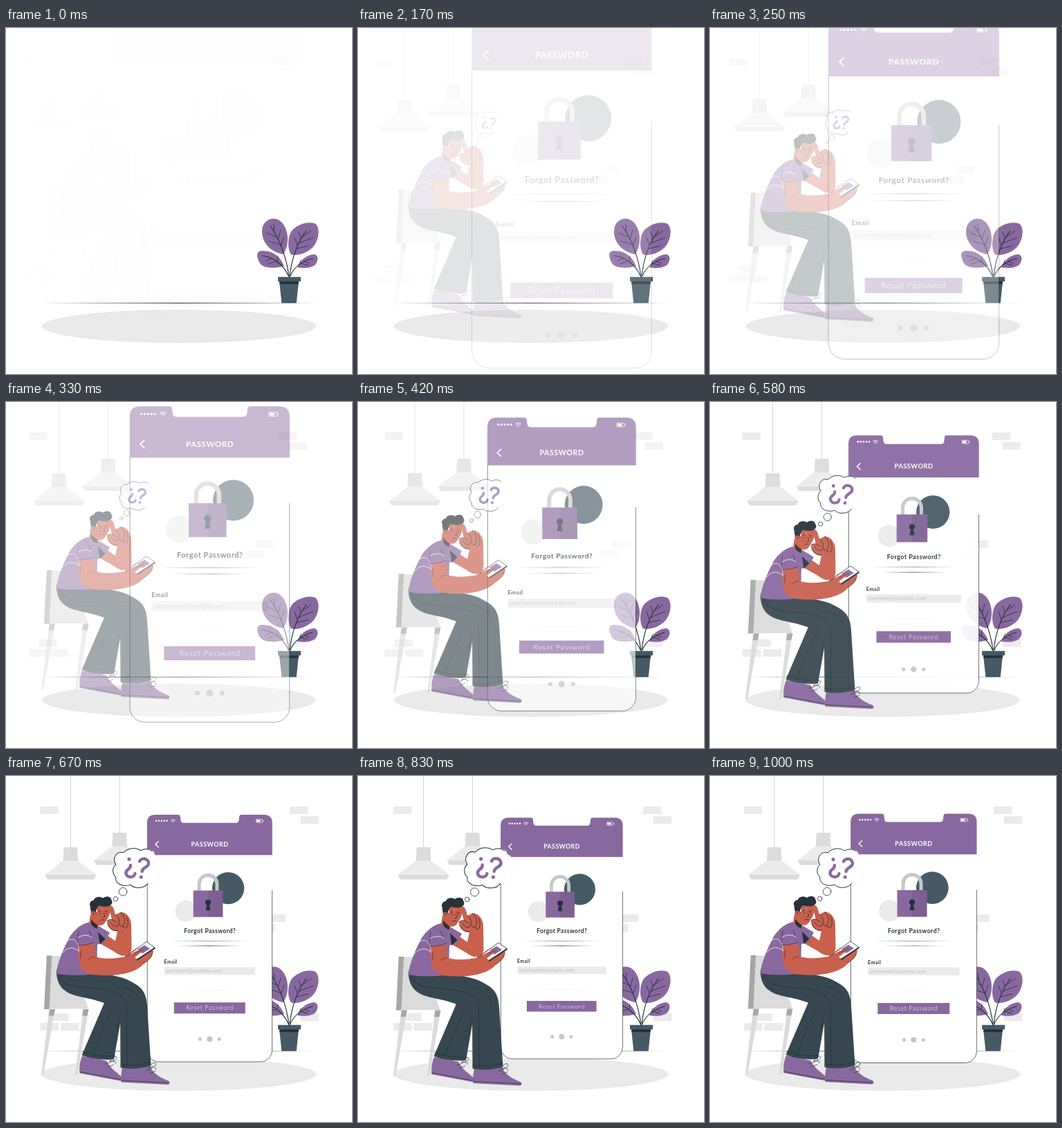
An HTML page that plays this animation: 500 px wide and 500 px high, repeating every 1.04 s.

```html
<!DOCTYPE html>
<html lang="en">
<head>
<meta charset="utf-8">
<title>Forgot password</title>
<style>
  html, body { margin: 0; width: 100%; height: 100%; overflow: hidden; background: #fff; }
  svg { display: block; width: 100vw; height: 100vh; }
  text { font-family: Lato, "Open Sans", sans-serif; font-weight: 700; }
  .thin { font-weight: 300; }
  .purple { fill: #8968a0; }
  .dark { fill: #263238; }
  .slate { fill: #455a64; }
  .pants { fill: #37474f; }
  .skin { fill: #c95f4d; }
  .pale { fill: #ebebeb; }
  .mid { fill: #dbdbdb; }
  .shade { fill: #a6a6a6; }
  .grey { fill: #c7c7c7; }
  .white { fill: #fff; }
  .ink { fill: none; stroke: #263238; stroke-linecap: round; stroke-linejoin: round; }
  .light { fill: none; stroke: #fff; stroke-linecap: round; stroke-linejoin: round; }
</style>
</head>
<body>
<svg viewBox="0 0 500 500" xmlns="http://www.w3.org/2000/svg">
  <defs>
    <g id="lamp">
      <path class="grey" d="M-.4-110h.8V0h-.8z"/>
      <path class="mid" d="M-9.8 0H9.8L10.8 20H-10.8z"/>
      <path class="pale" d="M-11 19.5H11L37 39.5V41H-37V39.5z"/>
      <path class="mid" d="M-37 40H37L33.5 46.5H-33.5z"/>
    </g>
  </defs>

  <g id="bricks" class="pale"></g>
  <g id="lamps">
    <use href="#lamp" x="92.8" y="103"/>
    <use href="#lamp" x="163.7" y="82"/>
  </g>

  <ellipse cx="250" cy="431" rx="198" ry="24" style="fill:#eaeaea"/>
  <path class="dark" d="M50 397.5L250 397.1L450 397.5L250 397.95z"/>

  <g id="plant">
    <g class="purple">
      <path d="M401 327C386 325 370 313 370 294C370 281 379 275.500 387 275.500C399 276 407 290 407 305C407 315 404 321 401 327z"/>
      <path d="M412 327.500C407 320 406 303 413 293C421 283 440 278 448 283.500C455 292 451 311 441 319C431 327 420 329 412 327.500z"/>
      <path d="M402 344C390 347.500 372 348 367 340C362 331 361 322 370 322C386 321.500 396 330 402 344z"/>
      <path d="M421 346C424 336 434 328 445 327C452 328 452 337 446 343C438 348 428 347 421 346z"/>
    </g>
    <g class="ink" stroke-width="1.200">
      <path d="M409 360C406 334 396 305 382 286M410 360C412 334 422 308 434 293M408 358C402 344 388 331 370 329M411 358C416 346 428 337 443 333"/>
      <path stroke-width=".8" d="M388 296L387 284M393 306L397 292M397 315L402 302M391 302L377 296M396 313L380 308M428 302L441 293M423 311L444 303M419 319L437 315M426 304L423 295M421 314L417 303M390 337L379 341M384 333L376 336M392 338L393 330M426 340L436 343M431 337L438 340M424 342L426 336"/>
    </g>
    <path class="slate" d="M395 366H423L419.700 397.500H398.300z"/>
    <path class="dark" d="M395 366H423L422.600 370H395.400z"/>
    <path class="slate" d="M393 359.700H426V366.200H393z"/>
  </g>

  <g id="phone">
    <rect class="white" x="203.500" y="60" width="181.800" height="354.500" rx="17"/>
    <path class="ink" stroke-width=".7" d="M203.500 113V397.500a17 17 0 0 0 17 17H368.300a17 17 0 0 0 17-17V165"/>
    <path class="purple" d="M203.200 113.200V66.500Q203.200 54.500 215 54.500H248.500Q251.500 54.500 251.700 58.500C252 64 252.500 66.500 257 66.500H332C336.500 66.500 337 64 337.300 58.500Q337.500 54.500 340.500 54.500H373.500Q385.500 54.500 385.500 66.500V113.200z"/>
    <g id="signal" class="white"></g>
    <path class="light" stroke-width=".9" d="M237.800 62.500q3.200-2.600 6.400 0M239.200 64.200q1.800-1.400 3.600 0M240.900 65.700h.2"/>
    <rect class="light" stroke-width=".7" x="361.800" y="61.300" width="9.500" height="4.600" rx="1"/>
    <path class="white" d="M362.700 62.200h5.500v2.800h-5.500zM371.900 62.700h.8v1.800h-.8z"/>
    <path class="light" stroke-width="1.400" d="M219.700 93.500L215.200 97.700L219.700 102"/>
    <text class="white" x="294.500" y="100.800" font-size="9" letter-spacing=".5" text-anchor="middle">PASSWORD</text>

    <circle class="slate" cx="321.300" cy="161.600" r="23.300"/>
    <circle class="pale" cx="259.700" cy="194.800" r="15.500"/>
    <path d="M279 167V155.500a13 13 0 0 1 26 0V167" fill="none" stroke="#c7c7c7" stroke-width="5"/>
    <path class="purple" d="M270.500 165H313.500V203.500H270.500z"/>
    <path fill="#000" opacity=".09" d="M292 165H313.500V203.500H292z"/>
    <circle class="dark" cx="292" cy="182.300" r="4"/>
    <path class="dark" d="M290.500 184h3L295.500 194h-7z"/>

    <text class="dark" x="294.700" y="227" font-size="8.700" letter-spacing=".42" text-anchor="middle">Forgot Password?</text>
    <path class="dark" d="M236 238.300L294 238.050L351 238.300L294 238.600zM248 245.700L294 245.450L341 245.700L294 246z"/>
    <text class="dark" x="228" y="271.600" font-size="7.100" letter-spacing=".4">Email</text>
    <path class="pale" d="M228.200 276.500H360.500V288H228.200z"/>
    <text x="231" y="284.500" font-size="7" letter-spacing=".25" style="font-weight:400" fill="#bdbdbd">username@example.com</text>
    <path class="pale" d="M236 310.500L294 310.200L351 310.500L294 310.800z"/>
    <path class="purple" d="M242.300 328H346.200V344H242.300z"/>
    <text class="white thin" x="294.500" y="339.200" font-size="8.900" letter-spacing=".65" text-anchor="middle">Reset Password</text>
    <g class="grey">
      <circle cx="280.300" cy="381.300" r="2.600"/>
      <circle cx="294.300" cy="381.300" r="4"/>
      <circle cx="308.300" cy="381.300" r="2.600"/>
    </g>
  </g>

  <g id="person">
    <path class="mid" d="M65.500 259.500H92L119 336H62z"/>
    <path class="shade" d="M58.800 259H66.200L62.500 336.500H55z"/>
    <path class="mid" d="M62.500 336.500H71L54 432H51zM111.500 336.500H119.500L103 432H100z"/>
    <path class="shade" d="M63 336.500H71L69 346H61.700zM111.500 336.500H119.500L117.500 346H110z"/>

    <path class="purple" d="M110 404C106 414 106 421 106.500 429L165 440Q169 439 167 434C159 427 150 421 145 411z"/>
    <path class="purple" d="M168 421C166 430 166 435 166.500 442L234 445.500Q238 444 235 440C224 436 213 430 207 418z"/>
    <path class="ink" stroke-width=".7" d="M106.500 427L165 438M166.500 439.500L236 443M143 416L151 413M147 420L155 417M203 425L211 422M208 429L216 426M150 412C153 405 161 403 160 407C159 411 153 411 150 412C156 411 161 413 158 415M207 421C210 413 217 412 217 416C216 420 211 420 207 421C214 419 218 421 216 424"/>
    <path class="pants" d="M143 325L109.500 403Q130 411 156 409L167 346L180 320z"/>
    <path class="pants" d="M73 285H130C154 286 173 291 185 299C198 306 203 315 204 332L209.500 418Q188 425 165.500 421L165 345C164 337 158 332 143 328C128 322 112 320 98 316C82 311 74 301 73 285z"/>
    <path class="ink" stroke-width=".8" d="M78 288C82 304 105 304 125 306C150 308 171 312 174 331L175 417M165 345L160 368M157 330L145 355L124 404M166 304C181 307 189 312 193 326M166 416Q188 420 209 413M111 398Q130 406 157 404"/>

    <path class="skin" d="M151 187C155 186 156 193 158 200L166 196C176 197 181 207 181 215L181.500 249C180 262 167 262 156 253L133 240L142 227L158 238L161 224C151 224 146 217 146 209Q149 206 153 207C151 199 149 192 151 187z"/>
    <path class="ink" stroke-width=".8" d="M146 209Q149 206 153 207L160 211M158 200C164 204 165 210 162 216C157 219 153 214 151 211M166 197C172 203 173 210 169 217Q166 218 164 214M174 203Q178 211 175 218Q172 221 169 217M147 214Q152 224 161 223"/>

    <path class="purple" d="M120 211C108 213 99 222 92 232C83 249 76 266 72 285Q100 290 131 285L132 243L143 239L150 226L135 217z"/>
    <path class="dark" d="M133 225L143.500 235L135.500 243z"/>
    <path class="skin" d="M122 200L133 203L134 218Q127 221 120 212z"/>
    <path class="dark" d="M123 207L132 215L132 220Q126 219 123 213z"/>
    <path class="skin" d="M124 188C121 196 122 207 128 212C134 217 140 217 144 210C149 204 152 195 152 187L146 180z"/>
    <path class="dark" d="M127 200C124 196 121 193 122 188C119 184 123 179 127 179C128 174 136 173 140 176C145 172 152 174 152 178C155 182 153 186 149 187C144 190 138 187 134 187L131 191L130 199z"/>
    <circle class="skin" cx="126.500" cy="198.500" r="3.400"/>
    <path class="ink" stroke-width=".8" d="M133.500 195.500L137 194M143 195L146.500 195.500M141.500 198L143 203L140 203.500M136 208Q139 206.500 142 207.500M125 197Q127 197 127 200"/>
    <circle class="dark" cx="136" cy="198" r=".8"/>
    <circle class="dark" cx="145" cy="198" r=".8"/>
    <path class="white" d="M131 192Q132.500 195 131 196.500Q129 195.500 131 192zM139 190q1 2 0 3q-1-1 0-3z"/>

    <path class="skin" d="M105 240L126 238L130 261C145 265 159 263 171 261L186 250L197 244L205 247L212 250C214 260 204 266 196 274C181 287 151 289 130 287C111 286 105 275 105 262z"/>
    <path class="purple" d="M109 217Q119 218 122 226L127 240Q116 245 104 244L103 228z"/>
    <path class="ink" stroke-width=".7" d="M104 244Q116 245 127 240M105 224Q102 236 104 247M120 223L123 230M108 252L108 263M128 261Q122 261 119 265"/>
    <path class="light" stroke-width=".75" d="M89 238C98 230 106 241 105 252M82 255C89 246 98 246 106 253M104 233Q116 226 124 233"/>
    <path class="white" d="M178 257L203 239L215 247.500L190 264z"/>
    <path class="ink" stroke-width=".8" d="M178 257L203 239L215 247.500L190 264"/>
    <path class="ink" stroke-width="1.800" d="M215 248.300L190 265"/>
    <path class="purple" d="M190 250L200 244L208 249L197 256z"/>
    <path class="skin" d="M180 257Q189 251 197 250Q200 252 196 254L188 260L181 266zM196 264L208 256Q213 251 213 253Q212 262 203 267z"/>
    <path class="ink" stroke-width=".7" d="M187 256Q194 251 198 251M199 270Q209 265 211 257M172 261L180 257"/>
  </g>

  <g id="bubble">
    <path class="white" d="M159 128C153 119 160 108 170 111C176 104 188 103 194 108C203 103 214 106 215 114C224 117 225 129 221 135C224 147 216 157 205 155C200 163 185 163 180 157C169 161 157 155 159 146C153 141 154 132 159 128z"/>
    <path class="ink" d="M205 155C200 163 185 163 180 157C169 161 157 155 159 146C153 141 154 132 159 128C153 119 160 108 170 111C176 104 188 103 194 108C200 105 207 105 211 109"/>
    <path class="ink" stroke-width=".3" stroke-dasharray="2 5" opacity=".35" d="M215 114C224 117 225 129 221 135C224 147 216 157 205 155"/>
    <circle class="white" cx="169.200" cy="167" r="5.800"/>
    <circle class="ink" stroke-width=".8" cx="169.200" cy="167" r="5.800"/>
    <circle class="white" cx="158.700" cy="177.300" r="3.200"/>
    <circle class="ink" stroke-width=".8" cx="158.700" cy="177.300" r="3.200"/>
    <g fill="none" stroke="#8968a0" stroke-width="4.300" stroke-linecap="round">
      <path d="M193 123.500C195 118 206 118.500 206 126.500C206 132.500 197 131.500 196.500 138"/>
      <path d="M180 129C180.500 136 172.500 134 173.500 141C175 148 186 147 186.500 141"/>
    </g>
    <circle class="purple" cx="195.200" cy="146" r="2.500"/>
    <circle class="purple" cx="178" cy="120.500" r="2.500"/>
  </g>
</svg>

<script>
const LOOP = 1040, DURATION = 1000, FPS = 24, LEAD = 33;
const byId = id => document.getElementById(id);

const brickCorners = [[49, 44], [410, 44], [425, 58], [377, 200], [362, 214],
  [63.5, 343], [425, 343], [49, 357], [79, 357]];
byId('bricks').innerHTML = brickCorners
  .map(([x, y]) => `<rect x="${x}" y="${y}" width="26.300" height="11"/>`).join('');
byId('signal').innerHTML = [0, 1, 2, 3, 4]
  .map(i => `<circle cx="${216.5 + i * 3.9}" cy="63.300" r="1.250"/>`).join('');

const bezier = (a, b, s) => 3 * a * s * (1 - s) ** 2 + 3 * b * s * s * (1 - s) + s ** 3;

// cubic-bezier(.36, -.01, .5, 1.38): settles after a small overshoot
function ease(x) {
  if (x >= 1) return 1;
  let low = 0, high = 1;
  for (let i = 0; i < 24; i++) {
    const s = (low + high) / 2;
    if (bezier(.36, .5, s) < x) low = s; else high = s;
  }
  return bezier(-.01, 1.38, low);
}

const scaleAt = (x, y, k) => `translate(${x} ${y}) scale(${k}) translate(${-x} ${-y})`;

function render(ms) {
  const t = Math.floor((ms % LOOP) / 10) * 10;
  const step = Math.floor((t + 5) * FPS / 1000);
  const p = ease((step * 1000 / FPS + LEAD) / DURATION);
  const offset = 30 * (p - 1);
  const poses = {
    bricks: `translate(${offset} 0)`,
    lamps: `translate(${offset} 0)`,
    phone: scaleAt(294.4, 234.6, 1.5 - .5 * p),
    person: `translate(0 ${offset})`,
    bubble: scaleAt(189, 143, .5 + .5 * p),
  };
  for (const [id, transform] of Object.entries(poses)) {
    const part = byId(id);
    part.setAttribute('transform', transform);
    part.setAttribute('opacity', Math.min(1, Math.max(0, p)));
  }
}

const start = performance.now();
function tick() {
  render(performance.now() - start);
  requestAnimationFrame(tick);
}
tick();
</script>
</body>
</html>
```
